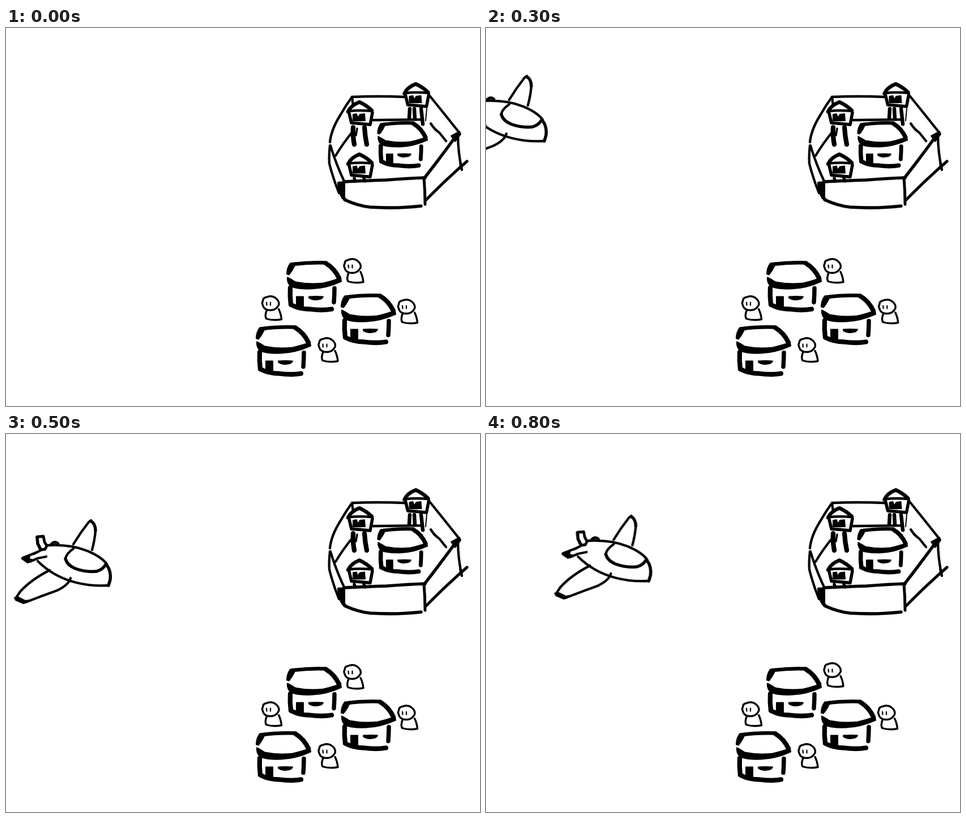
These frames come from a looping animation (837 by 669 pixels, 0.9 s). An HTML page:

```html
<!DOCTYPE html>
<html lang="en">
<head>
<meta charset="utf-8">
<title>Plane over a village</title>
<style>
  html, body { margin: 0; width: 100%; height: 100%; overflow: hidden; background: #fff; }
  svg { display: block; width: 837px; height: 669px; }
  path { fill: none; stroke: #000; stroke-width: 4.3; stroke-linecap: round; stroke-linejoin: round; }
  .thin { stroke-width: 3.4; }
  .mid { stroke-width: 5.5; }
  .bold { stroke-width: 8.3; }
  .ink { fill: #000; stroke-width: 2; }
  .paper { fill: #fff; }
  .blank { fill: #fff; stroke: none; }

  #plane, .walker { animation: 900ms step-end infinite; }
  #plane { animation-name: fly; }
  #north { animation-name: hop; }
  #west { animation-name: lean; }
  #east { animation-name: step; }
  #south { animation-name: bob; }

  @keyframes fly {
    0% { transform: translate(-260px, -200px); }
    11.111% { transform: translate(-198px, -155px); }
    22.222% { transform: translate(-155.5px, -128px); }
    33.333% { transform: translate(-114px, -90px); }
    44.444% { transform: translate(-72px, -51px); }
    55.555% { transform: translate(-36px, -22px); }
    66.666% { transform: none; }
    77.777% { transform: translate(44.5px, -6.5px); }
    88.888%, 100% { transform: translate(70.5px, -30px); }
  }
  @keyframes hop {
    0% { transform: none; }
    22.222% { transform: translateY(-.7px); }
    33.333% { transform: none; }
    77.777% { transform: translateY(-2.5px); }
    88.888%, 100% { transform: translateY(-3.3px); }
  }
  @keyframes lean {
    0% { transform: none; }
    44.444% { transform: translateX(-1px); }
    55.555%, 100% { transform: none; }
  }
  @keyframes step {
    0% { transform: none; }
    11.111% { transform: translateX(1.5px); }
    22.222% { transform: translateX(2.7px); }
    33.333% { transform: translateX(1.2px); }
    44.444%, 100% { transform: none; }
  }
  @keyframes bob {
    0% { transform: none; }
    44.444% { transform: translateY(-1.3px); }
    55.555% { transform: none; }
    77.777% { transform: translateY(-1.5px); }
    88.888%, 100% { transform: none; }
  }
</style>
</head>
<body>
<svg viewBox="0 0 837 669">
  <defs>
    <g id="house">
      <path class="blank" d="M500 418L565 413L591 444L582 456L580 497L520 499L502 490V455L496 440Z"/>
      <path style="stroke-width:6.5" d="M505 418Q533 414 564 415"/>
      <path class="ink" d="M502 416L512 415Q507 427 500 436L496 435Q496 424 502 416Z"/>
      <path class="bold" d="M565 416Q580 425 588 442"/>
      <path class="ink" d="M497 441Q503 444 511 449Q536 454 560 451Q574 448 591 442L592 448Q566 460 540 461Q513 462 502 456Q496 449 497 441Z"/>
      <path class="bold" d="M502 459Q501 474 503 489"/>
      <path class="bold" d="M503 489Q517 497 536 497Q558 500 575 497"/>
      <path style="stroke-width:7.5" d="M580 460Q580 471 579 485"/>
      <path class="ink" d="M513 475L525 475L525 493L513 492Z"/>
      <path class="ink" d="M535 475Q547 474 560 475Q558 480 551 480Q542 482 535 477Z"/>
    </g>

    <g id="person">
      <path class="thin paper" d="M605 433Q601 442 604 448Q617 452 631 449Q630 439 626 431"/>
      <path class="thin paper" d="M598 417Q598 411 604 410Q613 406 620 411Q628 417 626 424Q621 433 612 433Q600 433 598 424Q596 420 598 417Z"/>
      <path style="stroke-width:2.2" d="M604.5 419L605 424M611.5 419L611.5 424"/>
    </g>

    <g id="tower">
      <path class="blank" d="M609 149L610 169L643 172L646 148L638 139L625 131L608 140L604 148Z"/>
      <path style="stroke-width:6.5" d="M604 148Q609 137 624 131Q637 137 646 146"/>
      <path d="M607 147Q625 145 646 147"/>
      <path class="mid" d="M606 151L610 168Q626 169 643 171L647 150"/>
      <path class="ink" d="M613 153L619 152L621 159L625 153L633 152L634 164L613 164Z"/>
    </g>
  </defs>

  <g id="fort">
    <path d="M613 138L611 122Q655 120 705 122"/>
    <path d="M611 122Q600 137 591 153Q574 180 572 202"/>
    <path d="M572 208Q570 225 571 240Q578 268 588 292"/>
    <path d="M573 208Q582 239 598 273"/>
    <path d="M582 226Q595 204 614 181"/>
    <path d="M648 163L735 162"/>
    <path d="M749 121Q774 152 801 186"/>
    <path d="M750 169Q757 180 765 185L777 200"/>
    <path style="stroke-width:2" d="M743 142L741 164"/>
    <path class="mid" d="M740 264Q765 232 797 188"/>
    <path class="ink" d="M786 191L801 183L803 188L793 201Z"/>
    <path d="M798 188Q798 220 805 251M802 235L803 246"/>
    <path style="stroke-width:5" d="M742 304Q775 270 814 236"/>
    <path class="mid" d="M598 272Q640 270 672 269Q710 266 740 265"/>
    <path style="stroke-width:5" d="M738 265Q740 288 740 312"/>
    <path class="ink" d="M586 273L598 272L598 300L603 306L594 302L587 289Z"/>
    <path class="mid" d="M598 304Q622 315 643 317Q690 320 733 315"/>
    <path class="bold" d="M613 176Q612 190 615 206M633 176Q634 192 637 206"/>
    <path class="thin" d="M620 178L618 190"/>
    <use href="#tower"/>
    <path class="mid" style="stroke-width:6.5" d="M713 143L712 160M721 143L722 161M733 143L736 170"/>
    <use href="#tower" x="99.5" y="-32"/>
    <use href="#house" transform="translate(202.5 -211.5) scale(.915)"/>
    <path class="mid" d="M615 266L617 271M632 266L634 271"/>
    <use href="#tower" y="92.5"/>
  </g>

  <use href="#house" y=".5"/>
  <use href="#house" x="96" y="58.5"/>
  <use href="#house" x="-54" y="114.5"/>

  <g class="walker" id="north"><use href="#person" y=".5"/></g>
  <g class="walker" id="west"><use href="#person" x="-144.5" y="66.5"/></g>
  <g class="walker" id="east"><use href="#person" x="95.5" y="72.5"/></g>
  <g class="walker" id="south"><use href="#person" x="-45" y="140.5"/></g>

  <g id="plane">
    <path d="M110 219Q150 217 180 229Q204 239 214 252"/>
    <path class="mid" d="M214 254Q222 265 220 280L217 290"/>
    <path d="M217 290Q188 292 160 285Q120 275 92 247"/>
    <path d="M155 225Q142 234 141 243"/>
    <path class="mid" d="M141 243Q144 254 158 260Q177 267 196 265Q207 262 212 253"/>
    <path d="M155 217Q167 197 182 178L186 175"/>
    <path class="mid" d="M186 176Q194 181 194 193"/>
    <path d="M194 193Q193 208 188 227"/>
    <path d="M113 263Q80 280 61 301L53 313"/>
    <path class="ink" d="M51 312L56 310L70 317L78 316L67 322L53 316Z"/>
    <path d="M70 320Q98 309 126 299Q147 289 150 277"/>
    <path class="mid" d="M91 205L92 216L97 226"/>
    <path style="stroke-width:4.8" d="M91 204L102 203L104 213L108 220L105 226L97 227"/>
    <path d="M89 232L66 241"/>
    <path class="ink" d="M64 241L78 237L77 243L84 245L74 250L64 243Z"/>
    <path d="M78 248L92 242L107 239M85 234L97 228"/>
    <path style="stroke-width:5" d="M116 217Q122 211 128 216"/>
  </g>
</svg>
</body>
</html>
```
